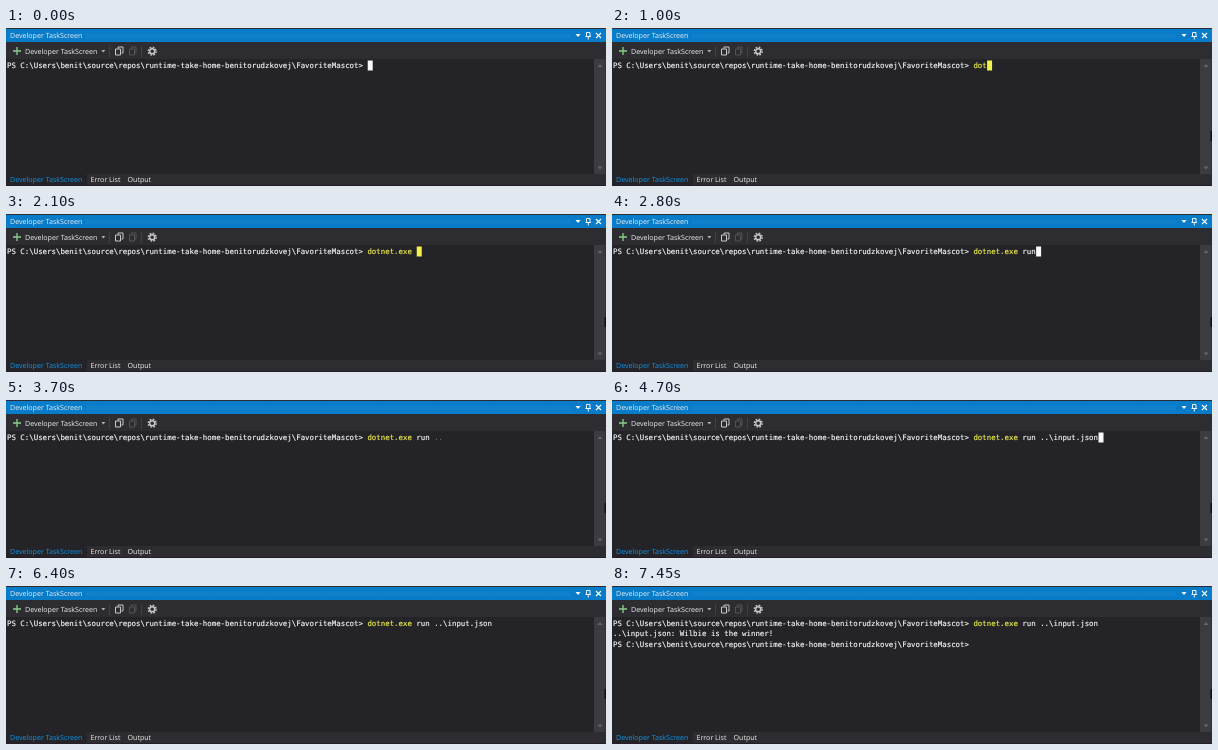
Animation, 600 px wide and 158 px high, one loop 8 s. Source, as an HTML page:

```html
<!DOCTYPE html>
<html lang="en">
<head>
<meta charset="utf-8">
<title>Terminal</title>
<style>
  html, body { margin: 0; width: 100%; height: 100%; overflow: hidden; background: #252526; }
  svg { display: block; width: 600px; height: 158px; }
  text { text-rendering: geometricPrecision; white-space: pre; }
  .ui { font: 7.1px "Open Sans", "Noto Sans", sans-serif; fill: #f0f0f2; }
  .term { font: 7.4px "DejaVu Sans Mono", monospace; fill: #f8f8f8; stroke: #f8f8f8; stroke-width: .15; }
  #cmd { fill: #f1f14c; stroke: #f1f14c; }
  .dim { fill: #77777a; stroke: none; }
  .line { fill: none; stroke: #c8c8ca; stroke-width: 1; }
</style>
</head>
<body>
<svg viewBox="0 0 600 158">
  <defs>
    <pattern id="grip" width="2.8" height="2.8" patternUnits="userSpaceOnUse">
      <path d="M0 0h1v1h-1zM1.4 1.4h1v1h-1z" fill="#59a8de"/>
    </pattern>
  </defs>
  <rect width="600" height="158" fill="#2d2d31"/>

  <!-- title bar -->
  <rect y="1" width="600" height="13" fill="#087cc8"/>
  <rect x="80" y="5.600" width="484" height="4.200" fill="url(#grip)" opacity=".45"/>
  <text class="ui" x="4" y="10.2">Developer TaskScreen</text>
  <path d="M569.5 6h5l-2.5 3z" fill="#fff"/>
  <path d="M580.5 4.5h3.5v4h-3.5zM579.5 8.5h5.5M582.3 8.5v3" fill="none" stroke="#fff" stroke-width=".9"/>
  <path d="M590 5l5 5M595 5l-5 5" stroke="#fff" stroke-width="1.1"/>

  <!-- toolbar -->
  <path d="M11 19v8M7 23h8" stroke="#8ccf8c" stroke-width="1.3"/>
  <text class="ui" x="19" y="25.6">Developer TaskScreen</text>
  <path d="M95.3 22h4l-2 2.4z" fill="#b0b0b2"/>
  <path d="M103.5 18v11M135.5 18v11" stroke="#414145"/>
  <path class="line" d="M112 20.5v-1.5h5v6h-1.5M109.5 21h5v6h-5z"/>
  <path class="line" d="M123.5 21h5v6h-5zM125.5 21v-2h4.5v6h-1.5" style="stroke:#525256"/>
  <circle class="line" cx="146.2" cy="23.2" r="3.9" stroke-dasharray="1.7 1.363" style="stroke-width:1.5"/>
  <circle class="line" cx="146.2" cy="23.2" r="2.5" style="stroke-width:1.4"/>

  <!-- terminal -->
  <rect y="31" width="600" height="115" fill="#242327"/>
  <rect x="588" y="31" width="11.5" height="115" fill="#3c3c40"/>
  <path d="M591.5 39h5l-2.5-3zM591.5 138.5h5l-2.5 3z" fill="#64646a"/>
  <rect id="mark" x="598.5" y="103" width="1.5" height="10" fill="#0f0f10"/>
  <rect id="cursor" width="5" height="10"/>
  <text class="term" x="1" y="40"><tspan class="prompt"></tspan><tspan id="cmd"></tspan><tspan id="args"></tspan></text>
  <g id="result">
    <text class="term" x="1" y="50.3">..\input.json: Wilbie is the winner!</text>
    <text class="term prompt" x="1" y="60.6"></text>
  </g>

  <!-- tabs -->
  <rect y="146" width="81" height="11" fill="#242327"/>
  <text class="ui" x="4" y="154.2" style="fill:#0e97ee">Developer TaskScreen</text>
  <text class="ui" x="84.5" y="154.2">Error List</text>
  <text class="ui" x="121.5" y="154.2">Output</text>
  <rect y="157" width="600" height="1" fill="#251c29"/>
</svg>
<script>
  const LOOP = 8000, ENTER = 5050, DONE = 6900;
  const BLINK = 529.6, BLINK_START = 35;
  const CELL = 4.457, ROW = 10.3;
  const PROMPT = 'PS C:\\Users\\benit\\source\\repos\\runtime-take-home-benitorudzkovej\\FavoriteMascot> ';
  const WHITE = '#f8f8f8', YELLOW = '#f1f14c', GRAY = '#77777a';

  // [time, input so far]; the long jumps are tab completions
  const keys = [
    [0, ''], [850, 'd'], [920, 'do'], [980, 'dot'], [1800, 'dotn'],
    [1950, 'dotnet.exe'], [2050, 'dotnet.exe '],
    [2560, 'dotnet.exe r'], [2650, 'dotnet.exe ru'], [2750, 'dotnet.exe run'],
    [2900, 'dotnet.exe run '], [3050, 'dotnet.exe run .'], [3180, 'dotnet.exe run ..'],
    [3900, 'dotnet.exe run ..\\'], [4150, 'dotnet.exe run ..\\i'],
    [4500, 'dotnet.exe run ..\\input.json']
  ];

  const $ = id => document.getElementById(id);
  const show = (el, on) => el.setAttribute('visibility', on ? 'visible' : 'hidden');
  document.querySelectorAll('.prompt').forEach(el => el.textContent = PROMPT);

  function cursorCell(t, typed) {
    if (t >= DONE) return [PROMPT.length, 2];
    if (t >= ENTER) return [0, 1];
    return [PROMPT.length + typed.length, 0];
  }

  function render(t) {
    const [pressed, typed] = keys.filter(k => k[0] <= t).pop();
    const [, cmd, args] = typed.match(/^(\S*)(.*)$/);
    const dots = /^( run )(\.+)$/.exec(args);
    $('cmd').textContent = cmd;
    $('args').innerHTML = dots ? `${dots[1]}<tspan class="dim">${dots[2]}</tspan>` : args;

    const [col, row] = cursorCell(t, typed);
    const lit = Math.floor((t - BLINK_START) / BLINK) % 2 !== 0;
    const cursor = $('cursor');
    cursor.setAttribute('x', 0.7 + col * CELL);
    cursor.setAttribute('y', 32.5 + row * ROW);
    cursor.setAttribute('fill', row || !cmd ? WHITE : dots ? GRAY : args.trim() ? WHITE : YELLOW);
    show(cursor, lit || (pressed > 0 && t - pressed < 250));

    show($('result'), t >= DONE);
    show($('mark'), t >= 50);
  }

  function tick() {
    render(performance.now() % LOOP);
    requestAnimationFrame(tick);
  }
  tick();
</script>
</body>
</html>
```
